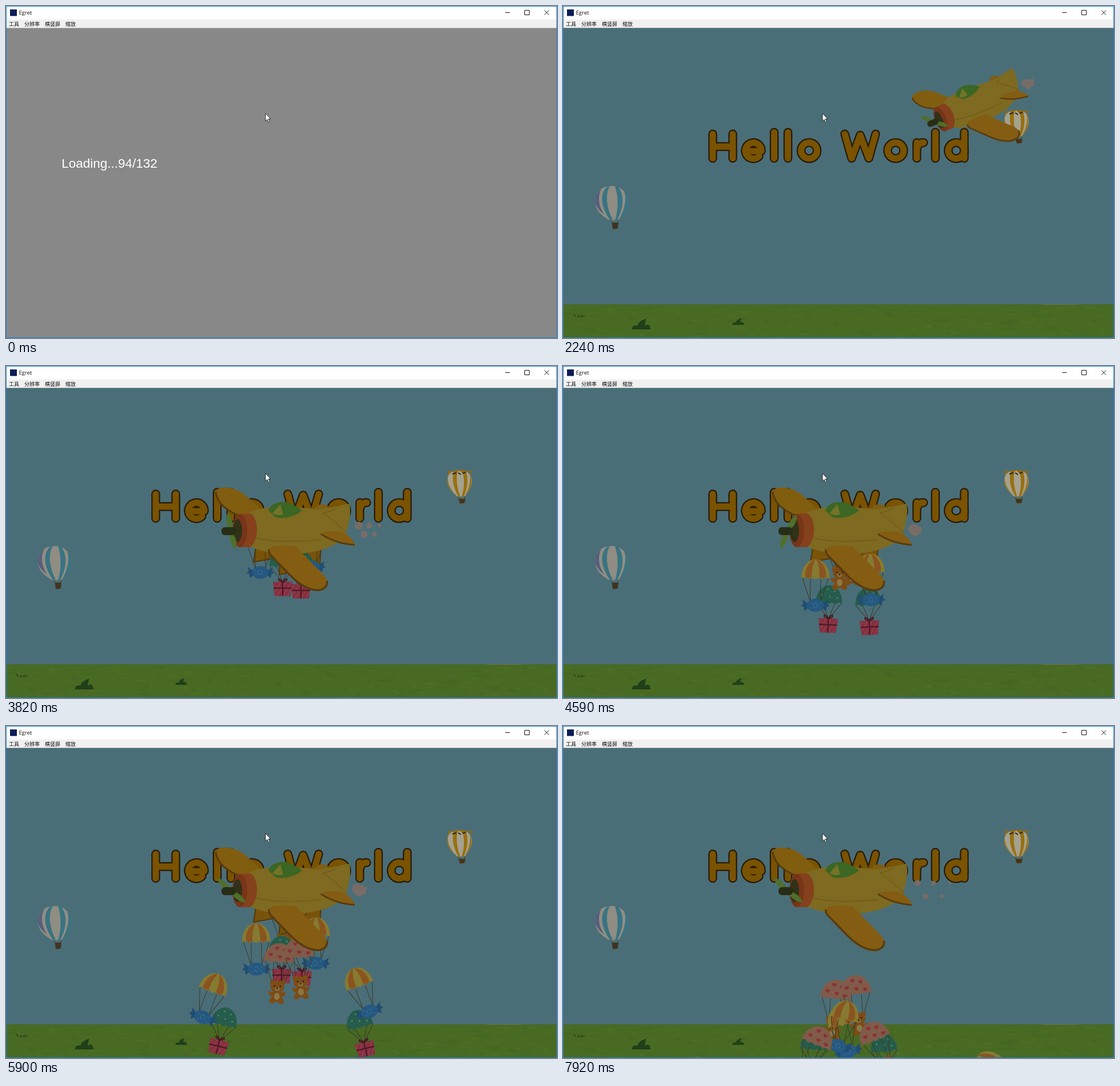
Animation, 964 px wide and 581 px high, one loop 8000 ms. Source, as an HTML page:

```html
<!DOCTYPE html>
<html lang="zh">
<head>
<meta charset="utf-8">
<title>Egret</title>
<style>
html, body { margin: 0; width: 100%; height: 100%; overflow: hidden; background: #888; }
svg { display: block; width: 964px; height: 581px; }
.ui { font: 9.5px "Open Sans", "Noto Sans CJK SC", sans-serif; fill: #111; }
.menu { font: 9px "Noto Sans CJK SC", "Noto Sans CJK", sans-serif; fill: #111; }
#loading { font: 22.5px "Liberation Sans", Arial, sans-serif; fill: #fff; text-anchor: middle; }
.word { fill: none; stroke-linecap: round; stroke-linejoin: round; }
.string { fill: none; stroke: #3b3926; }
</style>
</head>
<body>
<svg viewBox="0 0 964 581">
<defs>
  <clipPath id="stage"><rect x="1" y="38.5" width="962" height="542"/></clipPath>
  <circle id="ring" r="14"/>
  <path id="stem" d="M0 221V266.500"/>
  <g id="letters">
    <path d="M262 224V266.500M297 224V266.500M262 246H297"/>
    <path d="M320 254H347A14 14 0 1 0 343 263"/>
    <use href="#stem" x="369.500"/><use href="#stem" x="393.500"/>
    <use href="#ring" x="430.500" y="253"/>
    <path d="M493 224L505 266.500L520 226L535 266.500L547 224"/>
    <use href="#ring" x="582" y="253"/>
    <path d="M619 239V266.500M619 251Q621 239 631 239"/>
    <use href="#stem" x="651.500"/>
    <use href="#ring" x="688" y="253"/><use href="#stem" x="702"/>
  </g>
  <path id="heart" d="M0 3C-6 -1 -2 -5 0 -2C2 -5 6 -1 0 3" fill="#8a3034"/>
  <path id="dome" d="M-23 9C-24 -12 -11 -23 0 -23S24 -12 23 9Q17 4 12 10Q6 5 0 10Q-6 5 -12 10Q-17 4 -23 9Z"/>
  <path id="blade" d="M0 0C-6 -9 -7 -23 0 -33C7 -23 6 -9 0 0Z" fill="#4f6f2b"/>
  <path id="stripe" d="M-4 -22C-14 -15 -18 -4 -17 6Q-14 6 -12 10Q-9 6 -6 7C-7 -4 -5 -15 -1 -23Z"/>

  <g id="present">
    <path class="string" d="M-22 8L0 36L-10 9M22 8L0 36L10 9"/>
    <use href="#dome" fill="#255c4b"/>
    <g fill="#56826f"><circle cx="-12" cy="-6" r="1.500"/><circle cx="-3" cy="-16" r="1.500"/><circle cx="9" cy="-13" r="1.500"/><circle cx="1" cy="-3" r="1.500"/><circle cx="14" cy="-1" r="1.500"/></g>
    <path d="M-17 35H17L14 60H-14Z" fill="#852f40"/>
    <path d="M-12 36L-16 44M-4 36L-13 53M5 36L-10 60M14 36L1 60M15 48L8 60" stroke="#963f4d" stroke-width="1.500"/>
    <path d="M0 35V60M-16 46H16M0 35C-13 33 -7 24 0 35C7 24 13 33 0 35" fill="none" stroke="#471720" stroke-width="2"/>
  </g>

  <g id="candy">
    <path class="string" d="M-23 8L-9 49L-9 10M23 8L9 49L9 10"/>
    <g transform="scale(1.07)">
      <use href="#dome" fill="#857b30"/>
      <g fill="#8a5420"><use href="#stripe"/><use href="#stripe" transform="scale(-1 1)"/></g>
    </g>
    <path d="M-12 53L-23 46L-21 53L-25 57L-20 59L-19 66L-11 60ZM12 53L23 46L21 53L25 57L20 59L19 66L11 60Z" fill="#214d72"/>
    <ellipse cy="56" rx="15" ry="11.500" fill="#255880"/>
    <g fill="none" stroke="#427292"><circle cy="56" r="4"/><path d="M-10 53L-7 51M8 51L10 54M-9 60L-6 62M7 62L9 60"/></g>
  </g>

  <g id="bear">
    <path class="string" d="M-24 8L-8 51L-9 9M24 8L8 51L9 9"/>
    <g transform="scale(1.17 1.06)">
      <use href="#dome" fill="#805b49"/>
      <use href="#heart" x="-13" y="-3"/><use href="#heart" x="-4" y="-14"/><use href="#heart" x="8" y="-11"/><use href="#heart" x="1"/><use href="#heart" x="14" y="2"/>
    </g>
    <g fill="#7d4c16">
      <circle cx="-9" cy="45" r="4.500"/><circle cx="9" cy="45" r="4.500"/>
      <ellipse cy="52" rx="12" ry="10.500"/><ellipse cy="68" rx="10" ry="11"/>
      <path d="M-8 62L-16 60L-14 67L-7 71ZM8 62L16 60L14 67L7 71Z"/>
      <circle cx="-8" cy="77" r="5"/><circle cx="8" cy="77" r="5"/>
    </g>
    <ellipse cy="69" rx="5" ry="6" fill="#8a7748"/><ellipse cy="56" rx="4" ry="3" fill="#8a7748"/>
    <g fill="#21170c"><circle cx="-5" cy="51" r="1.300"/><circle cx="5" cy="51" r="1.300"/><circle cy="55" r="1.500"/></g>
  </g>
</defs>

<rect width="964" height="581" fill="#fff"/>
<rect y="23.500" width="964" height="15.500" fill="#f0f0f0"/>
<rect x="7" y="6" width="12" height="11.500" fill="#0b1b57"/>
<text class="ui" x="22.500" y="15.300">Egret</text>
<path d="M873.500 11.500H881.500M907.500 7.500H915.500V15.500H907.500ZM942 7.500L950 15.500M950 7.500L942 15.500" fill="none" stroke="#111"/>
<g class="menu"><text x="5" y="34.500">工具</text><text x="32" y="34.500">分辨率</text><text x="68" y="34.500">横竖屏</text><text x="104" y="34.500">缩放</text></g>
<rect x="1" y="38.500" width="962" height="542" fill="#888"/>
<text id="loading" x="181" y="283"></text>

<g id="scene" clip-path="url(#stage)">
  <rect y="38" width="964" height="485" fill="#4a6e78"/>
  <rect y="522" width="964" height="59" fill="#486a23"/>
  <g id="turf"></g>
  <path d="M842 522.500H902" stroke="#6b7050" stroke-width="1.200"/>
  <g fill="#1f4019">
    <path id="tuft" d="M121 566C121 560 125 557 130 560C131 554 138 549 146 547C143 553 144 557 143 560C148 555 153 559 153 566Z"/>
    <use href="#tuft" transform="translate(221.500 207) scale(.62)"/>
  </g>
  <path d="M18 539L22 544M25 545L27 540M28 545L34 540M33 544L38 542" stroke="#263f1b" stroke-width="1.500"/>

  <g>
    <path d="M56 342C56 325 69 315 85 315S114 326 114 344C113 357 105 365 97 374L82 375C69 368 56 358 56 342Z" fill="#908d82"/>
    <path d="M78 316C65 325 64 350 83 375L87 374C75 350 74 329 82 315ZM91 315C97 334 97 355 91 375L95 374C107 352 107 330 97 317ZM107 324C112 338 108 356 99 372C111 362 114 354 114 344C114 335 112 329 107 324Z" fill="#397482"/>
    <path d="M56 342C56 333 60 325 67 320C60 334 62 349 72 365C62 357 56 350 56 342Z" fill="#565f7c"/>
    <path d="M82 374L87 380M97 374L95 380" stroke="#4b4431"/>
    <path d="M85.500 379H97L95.500 390L87 390.500Z" fill="#403420"/>
  </g>
  <g>
    <path d="M772 199C773 188 781 182 794 182S815 190 815 202C815 213 807 222 803 228L790 229C780 220 771 211 772 199Z" fill="#a5a18f"/>
    <path d="M774 190C770 203 778 217 790 228C772 214 769 202 774 190ZM783 184C780 201 783 215 792 229H795C789 214 787 198 790 182ZM798 182C803 199 802 214 797 229L801 228C808 213 809 198 805 184ZM811 188C814 202 810 216 802 228C814 216 818 203 811 188Z" fill="#98700f"/>
    <path d="M773 191L773 183L780 184L787 188L793 183L800 189L807 183L814 183L814 190L809 185Q794 178 778 186Z" fill="#916a0f"/>
    <path d="M781 189L788 187M791 187L796 190M799 188L804 186" stroke="#29200f" stroke-width="2"/>
    <path d="M790 228L793 233M803 228L802 233" stroke="#453b26"/>
    <path d="M791.500 232.500H804L802 240L794 240.500Z" fill="#493313"/>
  </g>

  <g class="word" role="img" aria-label="Hello World">
    <use href="#letters" stroke="#271a0c" stroke-width="15.500"/>
    <use href="#letters" stroke="#7a5300" stroke-width="11"/>
  </g>

  <g id="doors" fill="#785309" stroke="#543809" stroke-width="2">
    <path d="M437 318L433 343L479 335V318Z"/><path d="M480 325L478 365L549 351L551 316Z"/>
  </g>
  <g id="drops"></g>
  <g id="plane">
    <g id="smoke" fill="#786c67"></g>
    <ellipse cx="553" cy="250" rx="12" ry="8" fill="#805d12"/>
    <path d="M366 222C367 208 402 209 422 229L454 258L425 270C398 262 370 246 366 222Z" fill="#815d10"/>
    <path d="M367 220C369 243 392 257 418 266" fill="none" stroke="#573b0c" stroke-width="3"/>
    <path d="M418 261C448 242 490 245 540 250C562 252 580 243 601 241C604 253 601 276 595 292C588 313 546 328 504 329C464 330 436 322 420 312Z" fill="#7e6a20"/>
    <path d="M438 301Q480 311 551 304M556 258Q579 274 598 293M555 257Q568 255 578 248" fill="none" stroke="#69531a"/>
    <path d="M459 253C464 239 480 236 494 239Q507 244 518 253C507 262 490 268 472 265Z" fill="#3b6623"/>
    <path d="M466 258L480 242L485 260Q476 263 466 258Z" fill="#74732a"/>
    <path d="M551 293C558 289 582 287 593 293C601 297 609 307 611 313C594 315 569 307 551 293Z" fill="#845d13"/>
    <path d="M551 294Q577 311 610 313" fill="none" stroke="#593c0e" stroke-width="3"/>
    <path d="M459 323C458 313 481 314 506 315L553 363C566 374 565 392 548 393C530 395 509 380 493 363L463 332Q459 327 459 323Z" fill="#845d12"/>
    <path d="M460 321Q459 327 464 332L493 362C511 381 530 394 548 392Q562 390 562 376" fill="none" stroke="#593c0d" stroke-width="3.500"/>
    <path d="M409 259L428 258C443 268 443 306 427 317L407 317Z" fill="#84411c"/>
    <ellipse cx="409" cy="288" rx="13" ry="29" fill="#783517"/>
    <ellipse cx="405" cy="288" rx="8" ry="20" fill="#303119"/>
    <g id="prop"><use href="#blade" transform="rotate(-46)"/><use href="#blade" transform="rotate(127)"/></g>
    <rect x="377" y="282" width="25" height="14" rx="6" fill="#282d15"/>
  </g>
</g>

<path d="M454 188V201.500L457 198.500L459.500 203.500L461.500 202.500L459 197.700H463Z" fill="#fff" stroke="#111" stroke-width=".8"/>
<rect x=".5" y=".5" width="963" height="580" fill="none" stroke="#1c84d8"/>
</svg>

<script>
const LOOP = 8000, SCENE = 980, ENTER = 1220, ARRIVE = 3200;
const $ = id => document.getElementById(id);
const clamp = v => Math.min(1, Math.max(0, v));
const mix = (a, b, p) => a + (b - a) * p;
const smooth = p => p * p * (3 - 2 * p);
const mod1 = v => v - Math.floor(v);
const show = (el, on) => { el.style.display = on ? "" : "none"; };

function add(parent, tag, attrs) {
  const el = document.createElementNS("http://www.w3.org/2000/svg", tag);
  for (const k in attrs) el.setAttribute(k, attrs[k]);
  return parent.appendChild(el);
}

// spread: distance from the middle at the start and end, for each wave
const kinds = {
  present: { born: 3100, gap: 1510, mid: 500, speed: .083, lift: -2, lean: .13, spread: [[16, 192], [14, 75]] },
  candy: { born: 3580, gap: 1220, mid: 490, speed: .072, lift: 5, lean: .25, spread: [[45, 255], [54, -18]] },
  bear: { born: 4300, gap: 1130, mid: 495, speed: .072, lift: 4, lean: .6, spread: [[11, 55], [8, 28]] }
};

const drops = [];
function drop(name, wave) {
  const kind = kinds[name];
  for (const side of [-1, 1]) {
    drops.push({
      ...kind, side,
      born: kind.born + wave * kind.gap,
      ends: kind.spread[wave],
      el: add($("drops"), "use", { href: "#" + name })
    });
  }
}
// Back to front
for (const name of ["bear", "present", "candy"]) drop(name, 1);
for (const name of ["present", "candy", "bear"]) drop(name, 0);

const puffs = Array.from({ length: 5 }, (_, i) => ({
  dx: 10 + 17 * i, dy: i % 2 ? 12 : -16, r: 10 - 1.4 * i, el: add($("smoke"), "circle")
}));

let seed = 7;
const rnd = () => (seed = seed * 16807 % 2147483647) / 2147483647;
for (let i = 0; i < 320; i++) {
  add($("turf"), "ellipse", {
    cx: rnd() * 964, cy: 526 + rnd() * 55, rx: 2 + rnd() * 9, ry: 1 + rnd() * 2,
    fill: rnd() < .5 ? "#3d6020" : "#597528", opacity: .1 + rnd() * .2
  });
}

function drawDrop(d, t) {
  const age = t - d.born;
  show(d.el, age > 0);
  const out = smooth(clamp((age - 750) / 3700));
  const [from, to] = d.ends;
  const x = d.mid + d.side * mix(from, to, out);
  const y = 285 + d.speed * age - d.side * d.lift;
  const turn = -d.side * d.lean * (to - from) * out;
  d.el.setAttribute("transform",
    `translate(${x} ${y}) rotate(${turn}) scale(${clamp(age / 250)})`);
}

function drawPlane(t) {
  const p = clamp((t - ENTER) / (ARRIVE - ENTER));
  const way = p * (1.25 - .25 * p);
  $("plane").setAttribute("transform",
    `translate(${mix(1000, 390, way)} ${mix(88, 289, way)}) rotate(${mix(-45, 0, p)}) ` +
    `scale(${mix(.545, 1, p)}) translate(-390 -289)`);
  show($("plane"), t >= ENTER);

  const pose = Math.floor(mod1((t - 5900) / 118 + .05) * 3);
  $("prop").setAttribute("transform", `translate(393 289) rotate(${pose * 37.5})`);

  const age = mod1((t - 4590) / 1245 + .15);
  for (const { dx, dy, r, el } of puffs) {
    el.setAttribute("cx", 612 + dx * age);
    el.setAttribute("cy", 288 + dy * age);
    el.setAttribute("r", r * (1 - .55 * age) * clamp(age * 8));
  }
}

function draw(t) {
  const step = clamp(Math.floor((t - 5) / 65) / 7);
  $("loading").textContent = `Loading...${Math.round(mix(94, 132, step))}/132`;
  show($("loading"), t < SCENE);
  show($("scene"), t >= SCENE);
  show($("doors"), t > ARRIVE && t < 7400);
  drawPlane(t);
  drops.forEach(d => drawDrop(d, t));
}

const begin = performance.now();
function tick() {
  draw((performance.now() - begin) % LOOP);
  requestAnimationFrame(tick);
}
tick();
</script>
</body>
</html>
```
